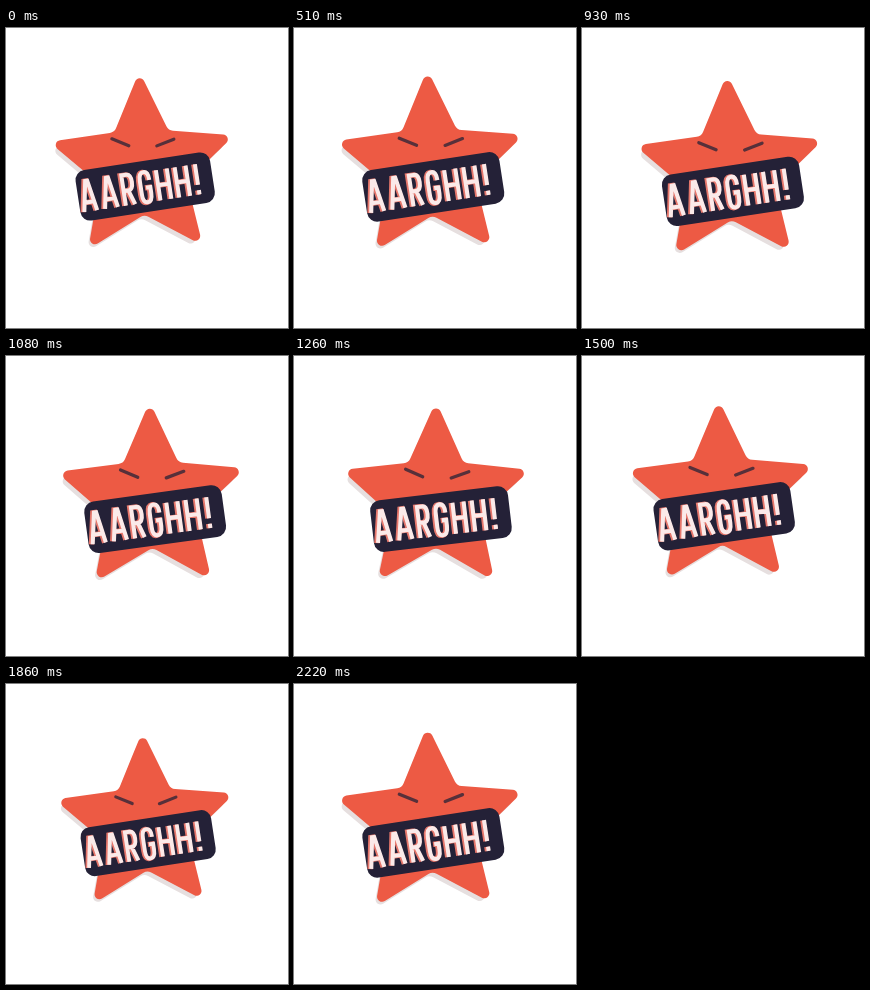
Write an HTML page with a canvas that moves like this. It is 282x300 px and loops after 2250 ms.

```html
<!DOCTYPE html>
<html lang="en">
<head>
<meta charset="utf-8">
<title>Angry star</title>
<style>
  html, body { margin: 0; width: 100%; height: 100%; overflow: hidden; background: #fff; }
  canvas { display: block; }
</style>
</head>
<body>
<canvas id="stage" width="282" height="300" role="img" aria-label="AARGHH!"></canvas>
<script>
const ctx = document.getElementById('stage').getContext('2d');
const LOOP = 2250, STEP = 30;
const CENTER = { x: 136.7, y: 140.6 };
const TURN = Math.PI / 180;

// turning points of the sideways sway: time, offset
const SWAY = [[0, 0], [510, 0], [930, 11.5], [1260, 5.3], [1440, 1], [1710, 12], [1860, 3], [LOOP, 0]];

// hand-drawn letters: outline in a unit box, width on the label
const GLYPHS = {
  A: { width: 13, path: 'M0 1 L.42 0 L.58 0 L1 1 M.16 .7 L.84 .7' },
  R: { width: 9.5, path: 'M0 1 V0 H.5 Q1 0 1 .26 Q1 .52 .5 .52 H0 M.5 .52 L1 1' },
  G: { width: 9.5, path: 'M1 .28 Q1 0 .5 0 Q0 0 0 .28 V.72 Q0 1 .5 1 Q1 1 1 .72 V.52 H.55' },
  H: { width: 11, path: 'M0 0 V1 M1 0 V1 M0 .5 H1' },
  '!': { width: 3, path: 'M.5 0 V.68 M.5 .86 V1' }
};

function buildLettering(text, x, y, height, gap) {
  const lettering = new Path2D();
  for (const char of text) {
    const { width, path } = GLYPHS[char];
    lettering.addPath(new Path2D(path), new DOMMatrix([width, 0, 0, height, x, y]));
    x += width + gap;
  }
  return lettering;
}

// five-pointed star around the origin with rounded tips and valleys
function buildStar(outer, inner, tilt) {
  const star = new Path2D();
  const corner = i => {
    const angle = (i * 36 - 90 + tilt) * TURN;
    const radius = i % 2 ? inner : outer;
    return [radius * Math.cos(angle), radius * Math.sin(angle)];
  };
  const first = corner(0), last = corner(9);
  star.moveTo((first[0] + last[0]) / 2, (first[1] + last[1]) / 2);
  for (let i = 0; i < 10; i++) {
    star.arcTo(...corner(i), ...corner(i + 1), i % 2 ? 8 : 5);
  }
  star.closePath();
  return star;
}

const star = buildStar(97.5, 46, -2.3);
const lettering = buildLettering('AARGHH!', -64, -14.5, 30.5, 8);

const bump = (time, center, width) => Math.exp(-(((time - center) / width) ** 2));

function swayAt(time) {
  const i = SWAY.findIndex(([t]) => t > time);
  const [t0, x0] = SWAY[i - 1], [t1, x1] = SWAY[i];
  const p = (time - t0) / (t1 - t0);
  return x0 + (x1 - x0) * p * p * (3 - 2 * p);
}

function drawStar() {
  ctx.save();
  ctx.translate(-3, 5);
  ctx.scale(0.97, 0.97);
  ctx.fillStyle = '#e6dfdf';
  ctx.fill(star);
  ctx.restore();

  ctx.fillStyle = '#ed5a44';
  ctx.fill(star);

  ctx.strokeStyle = '#57303a';
  ctx.lineWidth = 3.2;
  ctx.lineCap = 'round';
  for (const side of [-1, 1]) {
    ctx.beginPath();
    ctx.moveTo(side * 14, -22.8);
    ctx.lineTo(side * 31, -29.6);
    ctx.stroke();
  }
}

function strokeLettering(color, width, shift) {
  ctx.save();
  ctx.translate(shift, 0);
  ctx.strokeStyle = color;
  ctx.lineWidth = width;
  ctx.stroke(lettering);
  ctx.restore();
}

function drawLabel(slide) {
  ctx.save();
  ctx.translate(2.6 + slide, 17.9);
  ctx.rotate(-9 * TURN);
  ctx.fillStyle = '#242137';
  ctx.beginPath();
  ctx.roundRect(-68, -25.5, 136, 51, 10);
  ctx.fill();

  ctx.lineCap = 'butt';
  ctx.filter = 'blur(0.5px)';
  strokeLettering('#e5766b', 5.2, -1.2);
  strokeLettering('#fbeae9', 4, 0);
  ctx.restore();
}

function draw(now) {
  const time = Math.floor((now % LOOP) / STEP) * STEP;
  const sway = swayAt(time);
  const tilt = bump(time, 1260, 200);
  const scale = 1.02 - 0.02 * bump(time, 0, 80) - 0.053 * bump(time, 1810, 190);

  ctx.fillStyle = '#fff';
  ctx.fillRect(0, 0, 282, 300);
  ctx.save();
  ctx.translate(CENTER.x + sway, CENTER.y + sway * 0.38 + tilt * 2);
  ctx.rotate((0.3 + 2 * tilt) * TURN);
  ctx.scale(scale, scale);
  drawStar();
  drawLabel(3 * tilt);
  ctx.restore();
}

const start = performance.now();
function tick() {
  draw(performance.now() - start);
  requestAnimationFrame(tick);
}
tick();
</script>
</body>
</html>
```
